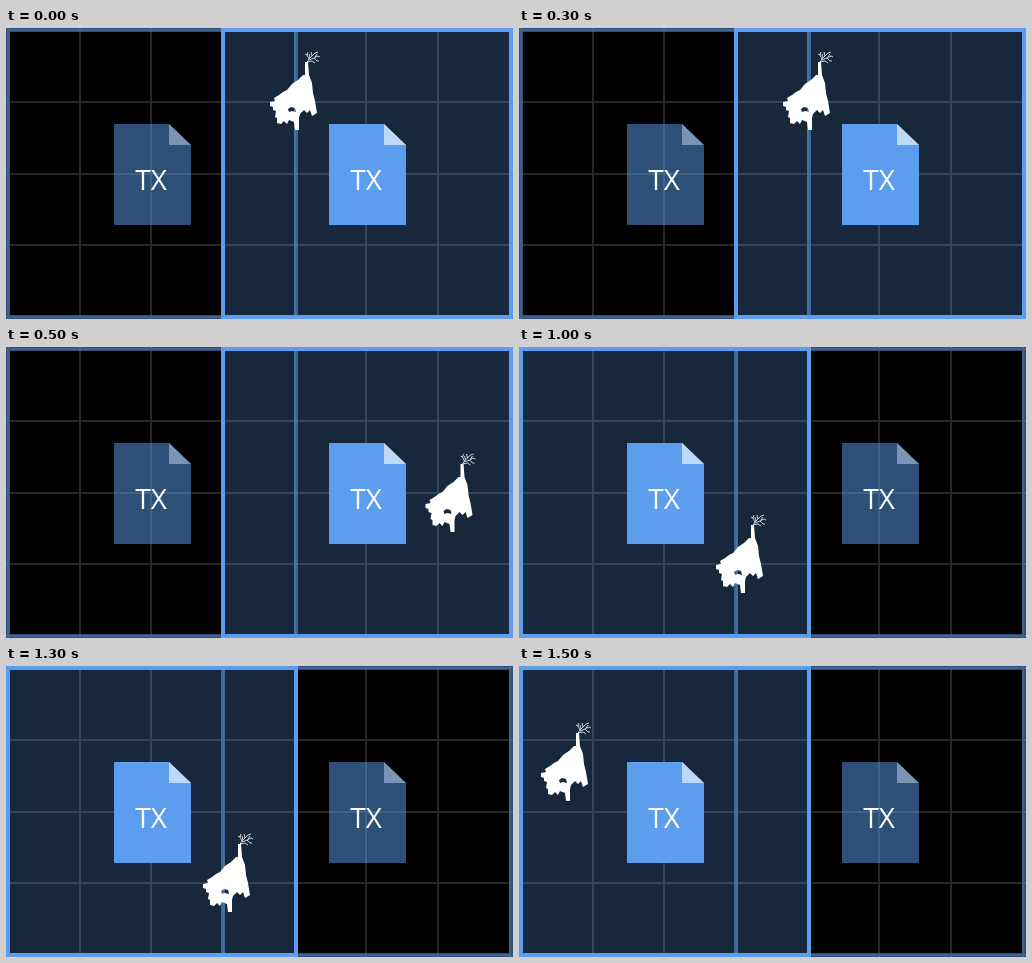
Recreate the animation shown at these times as an HTML page. Size 507x291 px, loop 2000 ms.

```html
<!DOCTYPE html>
<html>
<head>
<meta charset="utf-8">
<style>
  html, body { margin: 0; width: 100%; height: 100%; overflow: hidden; background: #000; }
  svg { display: block; width: 507px; height: 291px; }
  .grid { stroke: #262626; stroke-width: 2; }
  .frame { fill: none; stroke: #5c9ded; stroke-width: 4; stroke-opacity: .5; }
  .page { fill: #5c9ded; fill-opacity: .5; }
  .fold { fill: #7b94b6; }
  .active .frame { fill: #5c9ded; fill-opacity: .25; stroke-opacity: 1; }
  .active .page { fill-opacity: 1; }
  .active .fold { fill: #bed8f8; }
  text { font: 28px "Open Sans", "Noto Sans", sans-serif; fill: #fff; text-anchor: middle; }
</style>
</head>
<body>
<svg viewBox="0 0 507 291">
  <path class="grid" d="M2 0V291M74 0V291M145 0V291M217.5 0V291M289 0V291M360 0V291M432 0V291M504 0V291
    M0 2H507M0 74H507M0 146H507M0 217H507M0 289H507"/>
  <defs>
    <g id="doc">
      <path class="page" d="M0 0H55L77 21V101H0Z"/>
      <path class="fold" d="M55 0V21H77Z"/>
      <text x="37" y="66">TX</text>
    </g>
  </defs>
  <g id="left"></g>
  <g id="right"></g>
  <g id="creature" fill="#fff">
    <path fill-rule="evenodd" d="M36 11L39 11 40 24 43 32 44 42 46 50 48 62 43 65 41 59 38 62 35 59 31 63
      30 67 30 79 26 79 25 71 20 69 18 73 15 70 12 73 8 72 8 67 6 66 7 60 4 59 4 56 1 55 1 51
      6 50 5 47 10 44 14 41 18 39 23 33 29 29 34 24 36 24Z
      M19 58L22 56 26 57 27 61 23 60 20 61Z"/>
    <path fill="none" stroke="#fff" stroke-width=".8" d="M37.500 12L40 8 38 4 39 1M38 4L36 3M40 8L43 5 42 1
      M43 5L46 2 49 1M40 9L45 7 49 5 51 6M45 7L48 10 50 10M46 6L48 3M38 11L43 10 46 12M41 7L40 3"/>
  </g>
</svg>
<script>
  const byId = id => document.getElementById(id);
  const left = byId('left'), right = byId('right'), creature = byId('creature');
  const stops = [[263, 23], [418.5, 106], [196, 167], [21, 56]];

  function buildSide(group, x, width, docX) {
    group.innerHTML = `<rect class="frame" x="${x}" y="2" width="${width}" height="287"/>
      <use href="#doc" x="${docX}" y="96"/>`;
    // A direct copy lets the page inherit the side's active styling.
    const doc = byId('doc').cloneNode(true);
    doc.removeAttribute('id');
    doc.setAttribute('transform', `translate(${docX} 96)`);
    group.querySelector('use').replaceWith(doc);
  }
  buildSide(left, 2, 288, 108);
  buildSide(right, 217, 288, 323);

  const start = performance.now();
  function draw(now) {
    const step = Math.floor(Math.max(0, now - start) % 2000 / 500);
    right.classList.toggle('active', step < 2);
    left.classList.toggle('active', step >= 2);
    creature.setAttribute('transform', `translate(${stops[step]})`);
    requestAnimationFrame(draw);
  }
  draw(start);
</script>
</body>
</html>
```
